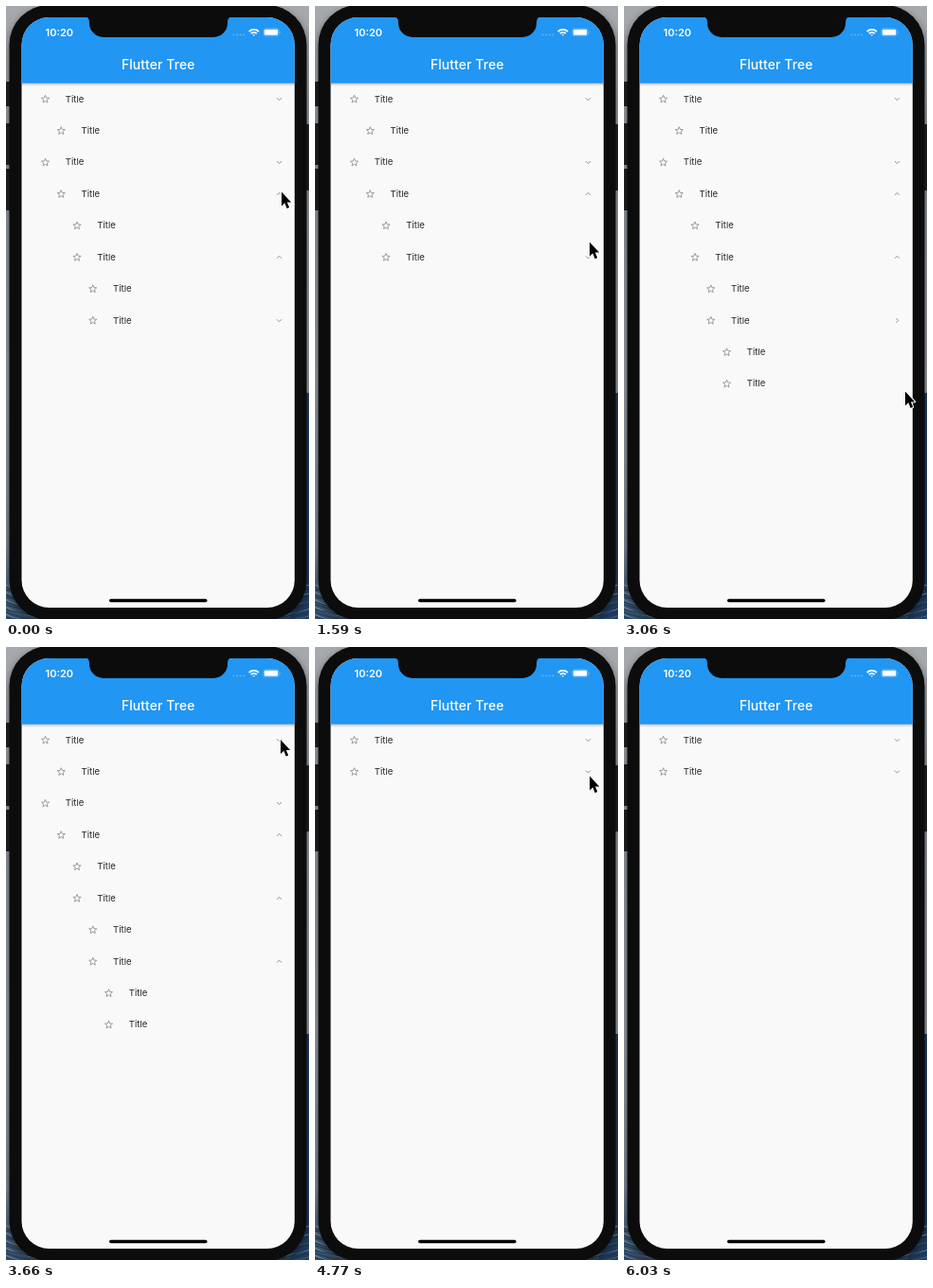
Recreate the animation shown at these times as an HTML page. Size 320 by 648 pixels, loop 6.06 s.

```html
<!DOCTYPE html>
<html lang="en">
<head>
<meta charset="utf-8">
<title>Flutter Tree</title>
<style>
html, body { margin: 0; width: 100%; height: 100%; overflow: hidden; background: #111; }
svg { display: block; width: 320px; height: 648px; }
text { font-family: Inter, Roboto, sans-serif; }
.row text { font-size: 9.6px; fill: #252525; }
.star { fill: none; stroke: #808080; stroke-width: .75; stroke-linejoin: miter; }
.chevron { fill: none; stroke: #8c8c8c; stroke-width: .95; }
</style>
</head>
<body>
<svg viewBox="0 0 320 648">
  <defs>
    <linearGradient id="wall" x1="0" y1="0" x2="0" y2="1">
      <stop offset="0" stop-color="#a6a9ad"/>
      <stop offset=".3" stop-color="#90969e"/>
      <stop offset=".62" stop-color="#9aa0a8"/>
      <stop offset=".88" stop-color="#7f8a97"/>
      <stop offset=".95" stop-color="#4d6780"/>
      <stop offset="1" stop-color="#34506d"/>
    </linearGradient>
    <linearGradient id="shade" x1="0" y1="0" x2="0" y2="1">
      <stop offset="0" stop-opacity=".25"/>
      <stop offset="1" stop-opacity="0"/>
    </linearGradient>
    <filter id="blur" x="-10%" y="-10%" width="120%" height="120%"><feGaussianBlur stdDeviation="5"/></filter>
    <clipPath id="screen"><rect x="16.5" y="12" width="288.3" height="624" rx="29"/></clipPath>
  </defs>

  <rect width="320" height="648" fill="url(#wall)"/>
  <rect x="300" y="409" width="20" height="239" fill="#1f3c60"/>
  <g id="waves" fill="none"></g>
  <rect x="3.5" y="3" width="314" height="650" rx="42" fill-opacity=".5" filter="url(#blur)"/>
  <path d="M0 80h5v26H0zM0 124h5v44H0zM0 172h5v44H0zM316 125h4v70h-4z" fill="#1b1b1b"/>
  <rect x="3.5" y="-1" width="314" height="650" rx="42" fill="#0c0c0c"/>

  <g clip-path="url(#screen)">
    <rect x="16" y="12" width="290" height="625" fill="#f9f9f9"/>
    <rect x="16" y="81" width="290" height="4" fill="url(#shade)"/>
    <rect x="16" y="12" width="290" height="69.6" fill="#2196f3"/>
    <path d="M82 11q6 0 6 6v1a15 15 0 0 0 15 15h116a15 15 0 0 0 15-15v-1q0-6 6-6z" fill="#0c0c0c"/>
    <text x="160.7" y="67" text-anchor="middle" font-size="13.9" font-weight="500" letter-spacing=".1" fill="#fff">Flutter Tree</text>
    <text x="41.5" y="31.8" font-size="11" font-weight="600" fill="#fff">10:20</text>
    <path d="M239.5 30.3h13" stroke="#fff" stroke-opacity=".25" stroke-width="1.8" stroke-dasharray="2 1.6"/>
    <g fill="none" stroke="#fff" stroke-width="1.8">
      <path d="M256.7 27a7.2 7.2 0 0 1 10.2 0M258.8 29.2a4.2 4.2 0 0 1 6 0"/>
      <path d="M260.4 30.2h2.8l-1.4 1.5z" fill="#fff" stroke="none"/>
    </g>
    <rect x="271.8" y="23.8" width="16.4" height="8" rx="2.3" fill="none" stroke="#fff" stroke-opacity=".3" stroke-width=".8"/>
    <rect x="272.8" y="24.8" width="14.4" height="6" rx="1.4" fill="#fff"/>
    <path d="M289.2 26.4q1.4 1.4 0 2.8z" fill="#fff" fill-opacity=".5"/>
    <g id="rows"></g>
    <rect x="109" y="626.8" width="103.5" height="3.5" rx="1.75" fill="#000"/>
  </g>

  <path id="cursor" d="M0 0V14.9L3.4 11.8L5.6 17.6L8.2 16.5L5.9 10.9H10.2Z"
        fill="#000" stroke="#fff" stroke-width="2" paint-order="stroke" stroke-linejoin="round"/>
</svg>

<script>
const LOOP = 6060, TOP = 98.2, PITCH = 33.43, INDENT = 16.75, TURN = 260;
const $ = id => document.getElementById(id);

function make(tag, attrs, parent) {
  const el = document.createElementNS('http://www.w3.org/2000/svg', tag);
  for (const key in attrs) el.setAttribute(key, attrs[key]);
  return parent.appendChild(el);
}

// Parent index for each node; `turns` lists [time, arrow up] and `open` lists [time, expanded].
const nodes = [
  { parent: -1, open: [[0, 1], [3830, 0]], turns: [[0, 0]] },
  { parent: 0 },
  { parent: -1, open: [[0, 1], [4560, 0]], turns: [[0, 0]] },
  { parent: 2, open: [[0, 1], [390, 0], [1230, 1]] },
  { parent: 3 },
  { parent: 3, open: [[0, 1], [390, 0], [2030, 1]] },
  { parent: 5 },
  { parent: 5, open: [[0, 0], [2930, 1]] },
  { parent: 7 },
  { parent: 7 }
];

const path = [
  [0, 291, 196.5], [300, 290, 200], [990, 290, 200.5], [1300, 290, 201],
  [1720, 290, 264], [2040, 290, 265], [2160, 290.5, 357.5], [2300, 291, 363],
  [2620, 291, 332], [2940, 292, 334], [3060, 297, 407.5], [3250, 297, 413],
  [3650, 290, 98], [3900, 290, 99], [4230, 290, 144], [4500, 290, 134],
  [4700, 290, 135], [5050, 291, 150.5], [5550, 291, 150.5], [5700, 291, 397],
  [5970, 294, 652], [LOOP, 294, 660]
];

const starPoints = Array.from({ length: 10 }, (_, i) => {
  const r = i % 2 ? 1.9 : 4.3, a = (i / 5 - .5) * Math.PI;
  return (r * Math.cos(a)).toFixed(2) + ',' + (r * Math.sin(a)).toFixed(2);
}).join(' ');

for (const node of nodes) {
  node.level = node.parent < 0 ? 0 : nodes[node.parent].level + 1;
  const x = node.level * INDENT;
  node.el = make('g', { class: 'row' }, $('rows'));
  make('polygon', { class: 'star', points: starPoints, transform: `translate(${41.5 + x} .4)` }, node.el);
  make('text', { x: 62.8 + x, y: 3.4 }, node.el).textContent = 'Title';
  if (node.open) node.chevron = make('path', { class: 'chevron', d: 'M-2.5 -1.2L0 1.3L2.5 -1.2' }, node.el);
}

for (let i = 0; i < 20; i++) {
  const y = 612 + i * 2.6, bend = 2 * Math.sin(i * 2.3);
  const color = i % 3 ? '#1b3550' : '#8493a2';
  make('path', { d: `M0 ${y}q10 ${bend + 4} 32 ${bend + 9}`, stroke: color, 'stroke-width': .9 }, $('waves'));
  make('path', { d: `M292 ${y + 9}q14 ${bend - 5} 28 ${bend - 9}`, stroke: color, 'stroke-width': .9 }, $('waves'));
}

const ease = p => p * p * (3 - 2 * p);
const lastStep = (steps, t) => steps.filter(s => s[0] <= t).pop();
const isOpen = (node, t) => lastStep(node.open, t)[1];

function isShown(node, t) {
  if (node.parent < 0) return true;
  const parent = nodes[node.parent];
  return isOpen(parent, t) && isShown(parent, t);
}

function angle(node, t) {
  const [start, up] = lastStep(node.turns || node.open, t);
  const p = start ? ease(Math.min(1, (t - start) / TURN)) : 1;
  return -180 * (up ? p : 1 - p);
}

function cursorAt(t) {
  const i = path.findIndex(k => k[0] > t);
  const [t0, x0, y0] = path[i - 1], [t1, x1, y1] = path[i];
  const p = ease((t - t0) / (t1 - t0));
  return [x0 + (x1 - x0) * p, y0 + (y1 - y0) * p];
}

function draw(t) {
  let y = TOP;
  for (const node of nodes) {
    const shown = isShown(node, t);
    node.el.style.display = shown ? '' : 'none';
    if (!shown) continue;
    node.el.setAttribute('transform', `translate(0 ${y})`);
    if (node.chevron) node.chevron.setAttribute('transform', `translate(288.5 .2) rotate(${angle(node, t)})`);
    y += PITCH;
  }
  $('cursor').setAttribute('transform', `translate(${cursorAt(t).join(' ')})`);
}

let origin;
function tick(now) {
  origin ??= now;
  draw((now - origin) % LOOP);
  requestAnimationFrame(tick);
}
draw(0);
requestAnimationFrame(tick);
</script>
</body>
</html>
```
